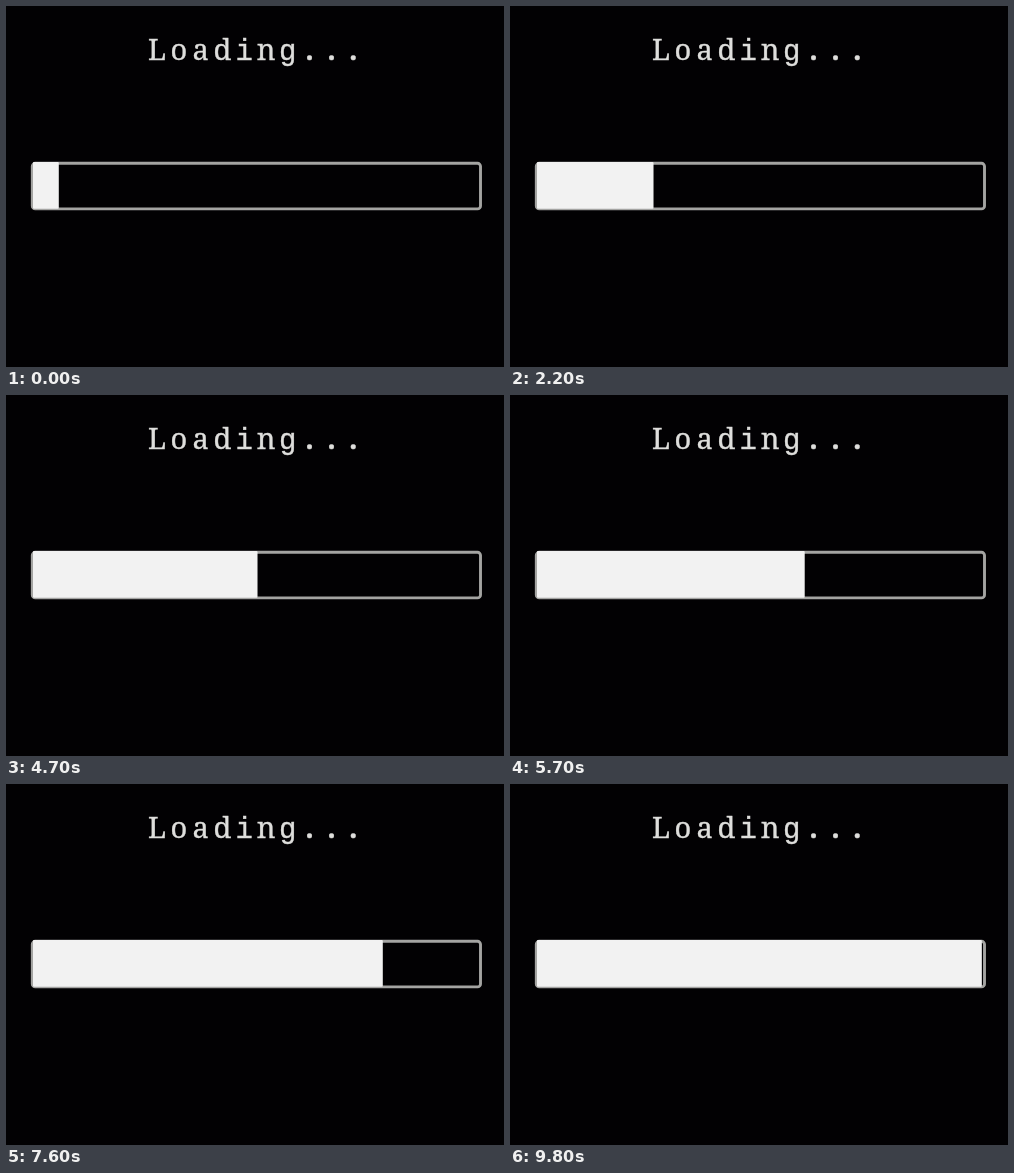
Recreate the animation shown at these times as an HTML page. Size 498 by 361 pixels, loop 9900 ms.

```html
<!DOCTYPE html>
<html lang="en">
<head>
<meta charset="utf-8">
<title>Loading</title>
<style>
  html, body { margin: 0; width: 100%; height: 100%; overflow: hidden; background: #020103; }
  svg { display: block; width: 498px; height: 361px; filter: blur(.5px); }
  text {
    font: 29px "Noto Serif", serif; text-anchor: middle;
    fill: #dededc; stroke: #dededc; stroke-width: .4;
  }
  .mono { font-family: "Liberation Mono", monospace; }
  .dot { font-weight: bold; }
</style>
</head>
<body>
<svg viewBox="0 0 498 361">
  <text id="label" y="53.5" aria-label="Loading..."></text>
  <rect x="26.3" y="157.3" width="448.2" height="45.6" rx="3" fill="#020103" stroke="#a4a4a2" stroke-width="2.9"/>
  <rect id="fill" x="27" y="156" height="46.8" rx="1" fill="#f2f2f2"/>
</svg>
<script>
  const LOOP = 9900, STEP = 100;
  const START_WIDTH = 25.8, GROWTH = 4.32, PAUSE_STEP = 15;

  // Typewriter spacing: every letter is centred in an equal cell.
  const label = document.getElementById("label");
  [..."Loading..."].forEach((letter, i) => {
    const span = document.createElementNS("http://www.w3.org/2000/svg", "tspan");
    span.setAttribute("x", 151 + 21.8 * i);
    if ("ig".includes(letter)) span.setAttribute("class", "mono");
    if (letter === ".") span.setAttribute("class", "dot");
    span.textContent = letter;
    label.append(span);
  });

  // The bar grows by equal steps and rests once.
  function widthAt(time) {
    const step = Math.floor(time / STEP);
    const moves = step - (step >= PAUSE_STEP ? 1 : 0);
    return START_WIDTH + GROWTH * moves;
  }

  const fill = document.getElementById("fill");
  function draw() {
    fill.setAttribute("width", widthAt(performance.now() % LOOP));
    requestAnimationFrame(draw);
  }
  draw();
</script>
</body>
</html>
```
